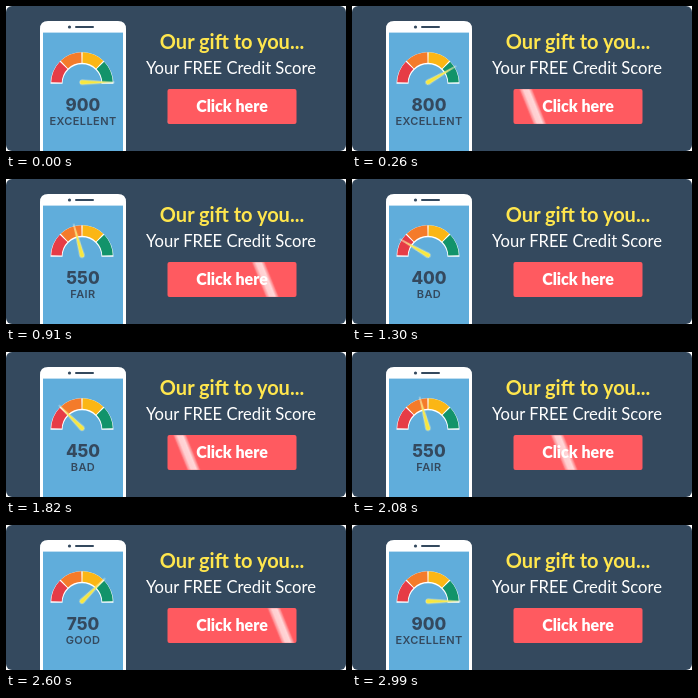
An HTML page that plays this animation: 340x145 px, repeating every 3.12 s.

```html
<!DOCTYPE html>
<html lang="en">
<head>
<meta charset="utf-8">
<title>Free credit score</title>
<style>
  html, body { margin: 0; width: 100%; height: 100%; overflow: hidden; background: #fff; }
  svg { display: block; width: 340px; height: 145px; }
  text { text-anchor: middle; font-family: Lato, sans-serif; }
  .score, .grade { font-family: Inter, sans-serif; fill: #34495e; }
  .score { font-size: 17px; font-weight: 800; }
  .grade { font-size: 11px; font-weight: 600; letter-spacing: .4px; }
  .arc circle { fill: none; stroke-width: 10.5; stroke-dasharray: 42.6 317.4; }

  /* twelve held poses down, the same twelve back up */
  #needle, #strip { animation: 1560ms steps(12, jump-none) infinite alternate; }
  #needle { animation-name: swing; }
  #strip { animation-name: count; }
  #shine { animation: sweep 1560ms steps(12, end) infinite; }
  @keyframes swing { from { transform: rotate(0deg); } to { transform: rotate(-165deg); } }
  @keyframes count { from { transform: translateY(0); } to { transform: translateY(-440px); } }
  @keyframes sweep { from { transform: translateX(149.5px); } to { transform: translateX(337.9px); } }
</style>
</head>
<body>
<svg viewBox="0 0 340 145">
  <defs>
    <clipPath id="window"><rect x="38" y="88" width="78" height="34"/></clipPath>
    <clipPath id="button"><rect x="161.5" y="83" width="129" height="35" rx="2"/></clipPath>
    <linearGradient id="glow">
      <stop offset="0" stop-color="#fff" stop-opacity=".2"/>
      <stop offset=".3" stop-color="#fff" stop-opacity=".7"/>
      <stop offset=".7" stop-color="#fff" stop-opacity=".75"/>
      <stop offset="1" stop-color="#fff" stop-opacity=".1"/>
    </linearGradient>
  </defs>

  <rect width="340" height="145" rx="6" fill="#34495e"/>

  <path d="M34 145V23q0-8 8-8H112q8 0 8 8V145z" fill="#fff"/>
  <rect x="37" y="26.6" width="80" height="118.4" fill="#60addb"/>
  <circle cx="63.5" cy="21" r="1.6" fill="#34495e"/>
  <path d="M70 21H87" stroke="#34495e" stroke-width="2" stroke-linecap="round"/>

  <g class="arc" transform="translate(76 77)">
    <path d="M-31.5 .7A31.5 31.5 0 0 1 31.5 .7H19.5A19.5 19.5 0 0 0-19.5 .7z" fill="#fff"/>
    <circle r="25.5" pathLength="360" stroke="#e63c46" transform="rotate(181.2)"/>
    <circle r="25.5" pathLength="360" stroke="#f47b2a" transform="rotate(226.2)"/>
    <circle r="25.5" pathLength="360" stroke="#fbb615" transform="rotate(271.2)"/>
    <circle r="25.5" pathLength="360" stroke="#12936a" transform="rotate(316.2)"/>
  </g>
  <g transform="translate(76 76.3)">
    <path id="needle" d="M0-2.3L32.5 0L0 2.3A2.3 2.3 0 0 1 0-2.3z" fill="#f8e73b"
          stroke="#fff" stroke-opacity=".6" stroke-width=".6" stroke-linejoin="round"/>
  </g>

  <g clip-path="url(#window)"><g id="strip"></g></g>

  <text x="226" y="42.8" font-size="20" font-weight="700" fill="#ffe64d">Our gift to you...</text>
  <text x="225" y="68" font-size="16.6" fill="#fff">Your FREE Credit Score</text>

  <g clip-path="url(#button)">
    <rect x="161" y="83" width="130" height="35" fill="#ff5a60"/>
    <text x="226" y="106" font-size="16" font-weight="900" fill="#fff">Click here</text>
    <g id="shine">
      <rect x="-6.5" y="-17.5" width="13" height="35" fill="url(#glow)"
            transform="translate(0 100.5) skewX(22)"/>
    </g>
  </g>
</svg>
<script>
  const strip = document.getElementById('strip');

  function addText(cls, y, str) {
    const t = document.createElementNS('http://www.w3.org/2000/svg', 'text');
    t.setAttribute('class', cls);
    t.setAttribute('x', 77);
    t.setAttribute('y', y);
    t.textContent = str;
    strip.append(t);
  }

  const grade = s => s >= 800 ? 'EXCELLENT' : s >= 700 ? 'GOOD' : s >= 550 ? 'FAIR' : 'BAD';

  for (let i = 0; i < 12; i++) {
    const score = 900 - 50 * i;
    addText('score', 105 + 40 * i, score);
    addText('grade', 119 + 40 * i, grade(score));
  }
</script>
</body>
</html>
```
